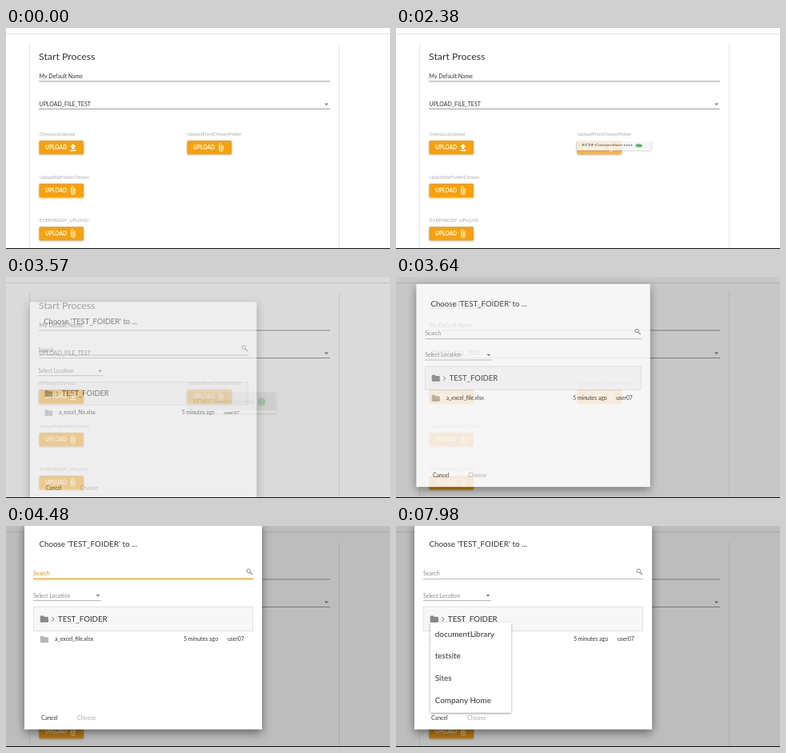
An HTML page that plays this animation: 480 by 277 pixels, repeating every 8 s.

```html
<!DOCTYPE html>
<html lang="en">
<head>
<meta charset="utf-8">
<title>Upload dialog</title>
<style>
html, body { margin: 0; width: 100%; height: 100%; overflow: hidden; background: #fff; }
svg { display: block; width: 100vw; height: 100vh; font-family: Lato, "Open Sans", sans-serif; }
.btn { filter: drop-shadow(0 1px 1px #0005); }
.menu { filter: drop-shadow(0 1px 1.5px #0006); }
.dialog { filter: drop-shadow(0 4px 6px #0007); }
</style>
</head>
<body>
<svg id="stage" viewBox="0 0 480 277"></svg>
<script>
const LOOP = 8000, ORANGE = '#f8a109';
const stage = document.getElementById('stage');

const text = (x, y, size, str, fill = '#333', extra = '') =>
  `<text x="${x}" y="${y}" font-size="${size}" fill="${fill}" ${extra}>${str}</text>`;
const rect = (x, y, w, h, fill, extra = '') =>
  `<rect x="${x}" y="${y}" width="${w}" height="${h}" fill="${fill}" ${extra}/>`;
const arrow = (x, y) => `<path d="M${x - 2.5} ${y - 1}h5l-2.5 2.5z" fill="#777"/>`;
const folder = (x, y, fill, id = '') =>
  `<path ${id} fill="${fill}" d="M${x} ${y + 1}q0-1 1-1h3l1.2 1.2h4q1 0 1 1v5q0 1-1 1h-8.2q-1 0-1-1z"/>`;

const uploadIcon = '<path d="M40.6 11v-3.200h-2l3.700-3.900 3.700 3.900h-2v3.200zM38.600 12h7.400v1.200h-7.400z" fill="#fff"/>';
const clipIcon = '<path d="M44.800 6v5.300a2.400 2.400 0 0 1-4.800 0v-6a1.600 1.600 0 0 1 3.200 0v5.500a.8.8 0 0 1-1.600 0v-4.800" fill="none" stroke="#fff" stroke-width=".9"/>';

const upload = (x, y, label, icon = clipIcon) => `
  ${text(x, y - 6, 5.9, label, '#aaa')}
  <g transform="translate(${x - .5} ${y})">
    ${rect(0, 0, 55.5, 17, ORANGE, 'rx="1.5" class="btn"')}
    ${text(7.5, 10.800, 6.6, 'UPLOAD', '#fff', 'font-weight="700"')}
    ${icon}
  </g>`;

const page = `
  ${rect(0, 0, 480, 277, '#fff')}
  ${rect(0, 7, 480, 1, '#e2e2e2')}
  ${rect(29, 20, 1, 257, '#e6e6e6')}
  ${rect(416, 20, 1, 257, '#e6e6e6')}
  ${text(41, 40, 12.300, 'Start Process')}
  ${text(41.5, 62.500, 7, 'My Default Name')}
  ${rect(41, 66.500, 364, .8, '#888')}
  ${text(41.5, 97.800, 7, 'UPLOAD_FILE_TEST')}
  ${arrow(400.5, 95.500)}
  ${rect(41, 101, 364, .8, '#888')}
  ${upload(42, 141, 'OnlyLocalUpload', uploadIcon)}
  ${upload(227, 141, 'UploadFromChosenFolder')}
  ${upload(42, 195, 'UploadNoFolderChosen')}
  ${upload(42, 249, 'EVERYBODY_UPLOAD')}`;

const menu = `
  <g id="menu">
    ${rect(226, 141, 112, 30, '#fff', 'rx="1" class="menu"')}
    ${rect(226, 144.500, 112, 22.500, '#f5f5f5')}
    <circle id="itemRipple" cx="262" cy="156" fill="#d6d6d6" clip-path="url(#itemClip)"/>
    ${text(234, 159, 7.850, 'ECM-Connection-test', '#222')}
    <circle cx="319.500" cy="156.500" r="5" fill="#3aa655"/>
  </g>`;

const dialog = `
  <g id="dialog">
    ${rect(23, -3.5, 297, 258.500, '#fff', 'class="dialog"')}
    ${text(41.5, 25.500, 9.8, "Choose 'TEST_FOIDER' to ...")}
    ${text(34, 62, 7, 'Search', '#888', 'id="search"')}
    ${rect(34, 66, 275, .7, '#999')}
    ${rect(34, 65.600, 275, 1.2, ORANGE, 'id="focusLine"')}
    ${rect(34, 56, .9, 8, '#a86400', 'id="caret"')}
    <path d="M305 58l3 3" stroke="#888" stroke-width="1.2"/>
    <circle cx="303.200" cy="56.200" r="2.300" fill="none" stroke="#888"/>
    ${text(34, 89.500, 6.95, 'Select Location', '#888')}
    ${arrow(115, 87)}
    ${rect(34, 93, 85, .7, '#999')}
    ${rect(34.5, 101.500, 274, 30, '#f7f7f7', 'stroke="#ddd" stroke-width=".8"')}
    ${folder(42.700, 112.500, '#888', 'id="crumb"')}
    <path d="M57.500 114l2.500 2.800-2.500 2.800" fill="none" stroke="#666" stroke-width=".9"/>
    ${text(65, 120.200, 9.7, 'TEST_FOIDER')}
    ${folder(42.700, 138, '#b8b8b8')}
    ${text(61, 144, 7, 'a_excel_file.xlsx')}
    ${text(222, 144, 7, '5 minutes ago')}
    ${text(277, 144, 6.8, 'user07')}
    ${text(44, 243, 7, 'Cancel')}
    ${text(89, 243, 7, 'Choose', '#aaa')}
    <g id="path">
      ${rect(43, 121, 101, 113, '#fff', 'class="menu"')}
      <g id="pathItems">
        ${['documentLibrary', 'testsite', 'Sites', 'Company Home']
          .map((name, i) => text(48.700, 138.700 + 27.600 * i, 9.95, name)).join('')}
      </g>
    </g>
  </g>`;

stage.innerHTML = `
  <clipPath id="itemClip">${rect(226, 144.500, 112, 22.500, '#000')}</clipPath>
  <clipPath id="btnClip">${rect(226.500, 141, 55.500, 17, '#000')}</clipPath>
  ${page}
  <circle id="btnRipple" cx="255" cy="150" fill="#fff" clip-path="url(#btnClip)"/>
  ${menu}
  ${rect(0, 0, 480, 277, '#000', 'id="shade"')}
  ${dialog}
  ${rect(0, 276, 480, 1, '#111')}`;

const set = (id, attrs) => {
  const node = document.getElementById(id);
  for (const key in attrs) node.setAttribute(key, attrs[key]);
};
const ramp = (t, from, to) => Math.min(1, Math.max(0, (t - from) / (to - from)));
const within = (t, from, to) => t >= from && t < to;
const scaleAt = (x, y, sx, sy) => `translate(${x} ${y}) scale(${sx} ${sy}) translate(${-x} ${-y})`;

// cubic-bezier(.25, .8, .25, 1), solved by bisection
function ease(x) {
  if (x <= 0 || x >= 1) return x <= 0 ? 0 : 1;
  const curve = (s, a, b) => 3 * (1 - s) ** 2 * s * a + 3 * (1 - s) * s * s * b + s ** 3;
  let lo = 0, hi = 1;
  for (let i = 0; i < 24; i++) {
    const mid = (lo + hi) / 2;
    if (curve(mid, .25, .25) < x) lo = mid; else hi = mid;
  }
  return curve(lo, .8, 1);
}

function draw(t) {
  // Upload button press and its drop-down
  set('btnRipple', {
    r: 36 * ease(ramp(t, 2080, 2400)),
    opacity: .22 * (1 - ramp(t, 2350, 2700))
  });
  const grow = ramp(t, 2298, 2398);
  const unfold = ease(ramp(t, 2398, 2720));
  set('menu', {
    transform: scaleAt(226, 141, grow, .5 * grow + .5 * unfold),
    opacity: grow * (1 - ramp(t, 3505, 3605))
  });
  set('itemRipple', { r: 90 * ramp(t, 3340, 3617) });

  // Dialog rises and fades in over the shaded page
  const open = ease(ramp(t, 3500, 3900));
  set('shade', { opacity: .26 * open });
  set('dialog', {
    transform: `translate(0 ${64.500 * (1 - open)}) ` + scaleAt(171.500, 126, .9 + .1 * open, .9 + .1 * open),
    opacity: open
  });

  // Search focus
  const focused = within(t, 3920, 6440);
  const spread = ease(ramp(t, 3920, 4200));
  set('search', { fill: focused ? '#dc9410' : '#888' });
  set('focusLine', {
    transform: scaleAt(171.500, 66, spread, 1),
    opacity: 1 - ramp(t, 6440, 6580)
  });
  const caretOn = within(t, 4060, 4480) || within(t, 5040, 5530) || within(t, 6090, 6440);
  set('caret', { opacity: +caretOn });

  // Folder path list
  set('crumb', { fill: within(t, 5950, 6440) ? '#555' : '#888' });
  const drop = ease(ramp(t, 6430, 6590));
  set('path', { transform: scaleAt(43, 121, 1, drop), opacity: drop });
  set('pathItems', { opacity: ramp(t, 6540, 6700) });
}

const start = performance.now();
function tick() {
  draw((performance.now() - start) % LOOP);
  requestAnimationFrame(tick);
}
tick();
</script>
</body>
</html>
```
